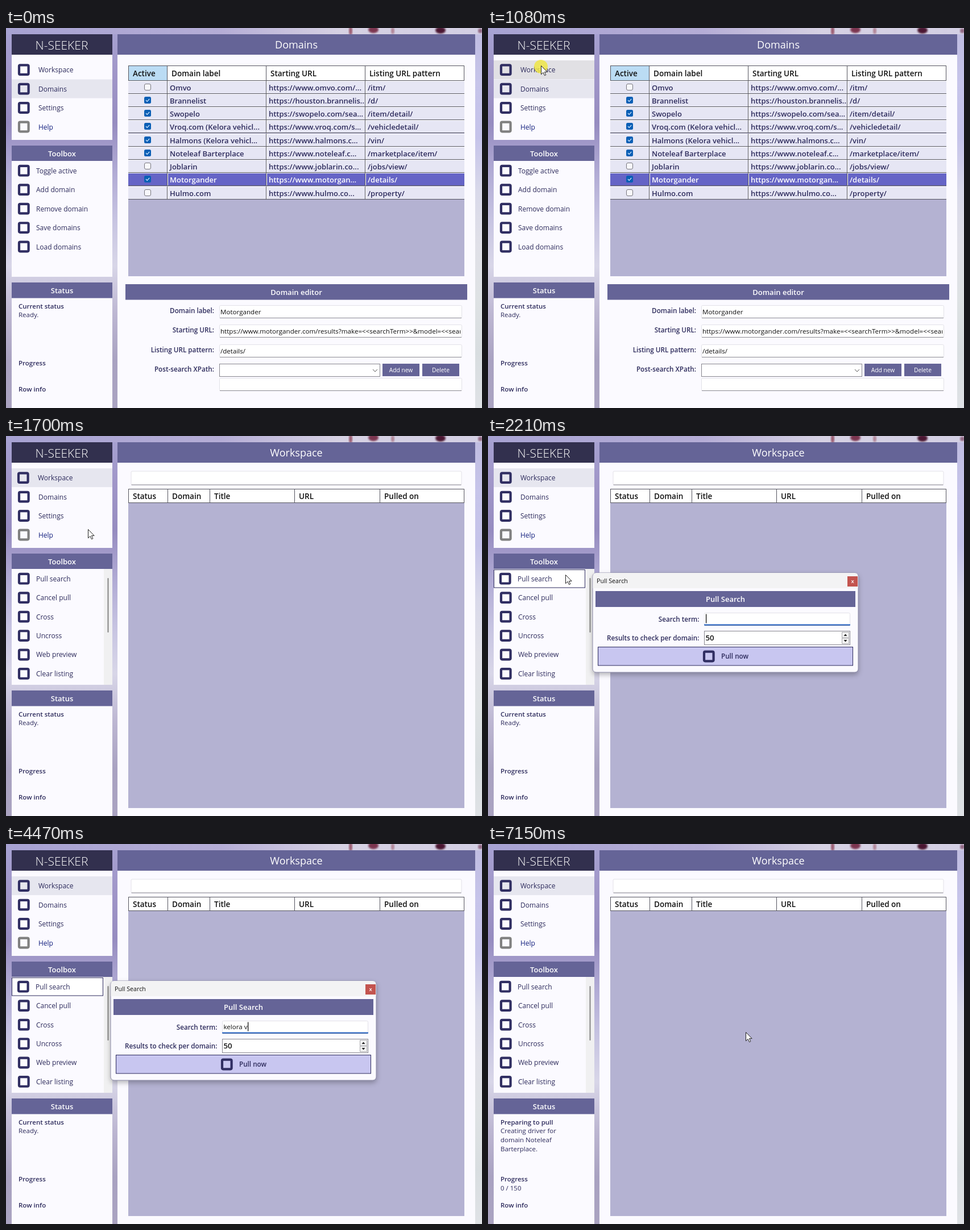
Animation of 837 by 669 pixels, one loop 8 s. Source, as an HTML page:

```html
<!DOCTYPE html>
<html lang="en">
<head>
<meta charset="utf-8">
<title>Search tool</title>
<style>
  html, body { margin: 0; width: 100%; height: 100%; overflow: hidden; }
  svg { display: block; width: 837px; height: 669px; font-family: "Open Sans", "Noto Sans", sans-serif; }
  text { white-space: pre; }
</style>
</head>
<body>
<svg id="stage" viewBox="0 0 837 669"></svg>
<script>
const NAVY = '#2d2b5c', BAR = '#656497', PANEL = '#fbfaff', BODY = '#b4b2d2', LINE = '#55555f';

const rect = (x, y, w, h, fill, more = '') =>
  `<rect x="${x}" y="${y}" width="${w}" height="${h}" fill="${fill}" ${more}/>`;
const frame = (x, y, w, h, fill, stroke, more = '') =>
  rect(x + .5, y + .5, w - 1, h - 1, fill, `stroke="${stroke}" ${more}`);
const escape = s => s.replace(/&/g, '&amp;').replace(/</g, '&lt;');
const text = (x, y, s, size, fill = NAVY, weight = 400, anchor = 'start', more = '') =>
  `<text x="${x}" y="${y}" font-size="${size}" fill="${fill}" font-weight="${weight}" text-anchor="${anchor}" ${more}>${escape(s)}</text>`;
const group = (id, body, more = '') => `<g id="${id}" ${more}>${body}</g>`;
const bar = (x, y, w, h, s, size = 13, weight = 600) =>
  rect(x, y, w, h, BAR) + text(x + w / 2, y + h / 2 + size * .39, s, size, '#fff', weight, 'middle');
const icon = (cx, cy, color = '#302e62') =>
  rect(cx - 8.3, cy - 8.3, 16.6, 16.6, 'none', `rx="2" stroke="${color}" stroke-width="4.2"`);
const item = (x, y, s, color, iconColor) => icon(31.3, y, iconColor) + text(x, y + 4.5, s, 12, color);
const field = (x, y, w, h) =>
  frame(x, y, w, h, '#fff', '#e2e1e8', 'rx="2"') + rect(x + 1, y + h - 1, w - 2, 1, '#8b8a92');
const tools = names => names.map((s, i) => item(53, 251.2 + i * 33.45, s)).join('');

function backdrop() {
  const grad = (id, ...colors) => `<linearGradient id="${id}" x2="0" y2="1">` + colors.map((c, i) =>
    `<stop offset="${i / (colors.length - 1)}" stop-color="${c}"/>`).join('') + '</linearGradient>';
  const spot = (x, y, rx, ry, c) => `<ellipse cx="${x}" cy="${y}" rx="${rx}" ry="${ry}" fill="${c}" filter="url(#soft)"/>`;
  return `<defs>
    ${grad('left', '#a7a2d2', '#a096c8', '#968cc0', '#b0aad4', '#c6c3e1', '#d8d6e8', '#bdb7d2', '#a9a2c1', '#aaa3c1')}
    ${grad('right', '#bfbce0', '#c6c4ea', '#c5c3ea', '#d9d9ea', '#e0e0e8', '#dee2e4', '#d8dde0', '#dfe2e6')}
    <linearGradient id="top"><stop stop-color="#a7a2d2"/><stop offset=".45" stop-color="#b5add6"/>
      <stop offset=".7" stop-color="#d6d1e3"/><stop offset="1" stop-color="#d3cfe4"/></linearGradient>
    <filter id="soft"><feGaussianBlur stdDeviation="1.6"/></filter>
  </defs>` + rect(0, 0, 500, 669, 'url(#left)') + rect(500, 0, 337, 669, 'url(#right)') + rect(0, 0, 837, 11, 'url(#top)') +
    spot(606, 5, 3, 8, '#9a5a70') + spot(646, 3, 9, 6, '#7c3550') + spot(680, 5, 3, 6, '#b08496') +
    spot(764, 4, 9, 6, '#4c1830') + spot(834, 5, 4, 4, '#8f6480');
}

function sidebar() {
  return rect(10, 11, 177, 186, PANEL) + rect(10, 11, 177, 36, '#32304e') +
    text(98, 38, 'N-SEEKER', 21, '#fff', 300, 'middle') +
    rect(10, 57, 177, 33, '#e6e6ef', 'id="navRow"') + rect(10, 57, 177, 33, '#e1e0e4', 'id="hover"') +
    group('navWork', item(57, 73.6, 'Workspace')) + item(57, 107.1, 'Domains') + item(57, 140.5, 'Settings') +
    item(57, 174, 'Help', '#14207f', '#808080') +
    rect(10, 207, 177, 231, PANEL) + bar(10, 207, 177, 27, 'Toolbox') +
    group('toolsDomains', tools(['Toggle active', 'Add domain', 'Remove domain', 'Save domains', 'Load domains'])) +
    group('toolsWork', rect(172, 234, 15, 204, '#f0f0f1') + rect(178.5, 250, 2, 96, '#858585', 'rx="1"') +
      frame(10, 235, 161, 32.5, '#fff', NAVY, 'id="focus"') +
      group('toolPull', tools(['Pull search'])) +
      group('toolRest', tools(['Cancel pull', 'Cross', 'Uncross', 'Web preview', 'Clear listing']), 'transform="translate(0 33.45)"')) +
    rect(10, 448, 177, 221, PANEL) + bar(10, 448, 177, 27.5, 'Status') +
    text(22, 493.5, 'Current status', 11.5, NAVY, 600, 'start', 'id="state"') +
    ['Ready.', '', ''].map((s, i) => text(22, 509.3 + i * 15.8, s, 11.5, NAVY, 400, 'start', 'class="detail"')).join('') +
    text(22, 594, 'Progress', 11.5, NAVY, 600) + text(22, 609.7, '0 / 150', 11.5, NAVY, 400, 'start', 'id="count"') +
    text(22, 640, 'Row info', 11.5, NAVY, 600);
}

function checkbox(cx, cy, on) {
  return on
    ? rect(cx - 6, cy - 6, 12, 12, '#0a5fb5', 'rx="2.5"') +
      `<path d="M${cx - 3} ${cy}l2.2 2.3 4-4.3" fill="none" stroke="#cfe6ff" stroke-width="1.2"/>`
    : frame(cx - 6, cy - 6, 12, 12, '#f7f7fb', '#77767e', 'rx="2.5"');
}

const sites = [
  [0, 'Omvo', 'https://www.omvo.com/...', '/itm/'],
  [1, 'Brannelist', 'https://houston.brannelis...', '/d/'],
  [1, 'Swopelo', 'https://swopelo.com/sea...', '/item/detail/'],
  [1, 'Vroq.com (Kelora vehicl...', 'https://www.vroq.com/s...', '/vehicledetail/'],
  [1, 'Halmons (Kelora vehicl...', 'https://www.halmons.c...', '/vin/'],
  [1, 'Noteleaf Barterplace', 'https://www.noteleaf.c...', '/marketplace/item/'],
  [0, 'Joblarin', 'https://www.joblarin.co...', '/jobs/view/'],
  [1, 'Motorgander', 'https://www.motorgan...', '/details/'],
  [0, 'Hulmo.com', 'https://www.hulmo.co...', '/property/']
];

function header(y, h, starts, names) {
  return frame(215, y, 591, h, '#fff', LINE) + names.map((s, i) =>
    (i ? rect(starts[i], y, 1, h, LINE) : '') + text(starts[i] + 8, y + h / 2 + 5, s, 13.5, '#111', 600)).join('');
}

function domains() {
  const cols = [215, 283, 457, 631];
  const rows = sites.map(([on, ...cells], i) => {
    const y = Math.round(92.6 + i * 23.25), hot = i === 7;
    return rect(215, y, 591, 23, hot ? '#6564c6' : '#e6e6f4') +
      rect(215, y, 591, 1, '#fff') + rect(215, y + 22, 591, 1, LINE) +
      checkbox(249, y + 11, on) + cells.map((s, j) =>
        rect(cols[j + 1], y, 1, 23, LINE) + rect(cols[j + 1] + 1, y, 1, 22, '#fff') +
        text(cols[j + 1] + 5, y + 16.6, s, 13, hot ? '#fff' : NAVY, 600)).join('');
  }).join('');
  const label = (y, s) => text(366, y, s, 11.7, NAVY, 600, 'end');
  const value = (y, s) => text(377, y, s, 11.6, '#111', 400, 'start', 'clip-path="url(#inputs)"');
  const button = (x, s) => rect(x, 591, 65, 22, BAR) + text(x + 32.5, 606, s, 10.3, '#fff', 400, 'middle');
  return '<clipPath id="inputs"><path d="M376 480h423v170h-423z"/></clipPath>' +
    bar(196, 11, 629, 36, 'Domains', 18, 400) + rect(215, 66, 591, 371, BODY) + rows +
    header(66, 27, cols, ['', 'Domain label', 'Starting URL', 'Listing URL pattern']) +
    frame(215, 66, 69, 27, '#bbdcf4', LINE) + text(223, 84.5, 'Active', 13.5, '#111', 600) +
    bar(210, 451, 601, 27.5, 'Domain editor') +
    label(501.5, 'Domain label:') + label(536, 'Starting URL:') + label(570.5, 'Listing URL pattern:') + label(605, 'Post-search XPath:') +
    [488, 522, 557, 616].map(y => field(375, y, 427, 23)).join('') +
    value(503.5, 'Motorgander') + value(538, 'https://www.motorgander.com/results?make=<<searchTerm>>&model=<<searchModel>>') +
    value(572.5, '/details/') + frame(375, 591, 283, 23, '#fff', '#87868e') +
    '<path d="M645 601l4 4 4-4" fill="none" stroke="#555"/>' + button(662, 'Add new') + button(732, 'Delete');
}

function workspace() {
  return bar(196, 11, 629, 36, 'Workspace', 18, 400) + field(219.5, 61.5, 582, 25) + rect(215, 93, 591, 562, BODY) +
    header(93, 25, [215, 284, 358, 507, 657], ['Status', 'Domain', 'Title', 'URL', 'Pulled on']);
}

function dialog() {
  const label = (y, s) => text(371.5, y, s, 11.7, NAVY, 600, 'end');
  return rect(184, 241, 467, 175, PANEL, 'rx="6" stroke="#8d8ba8" style="filter:drop-shadow(0 4px 4px #0004)"') +
    '<path d="M184.5 268v-21q0-6 6-6h454q6 0 6 6v21z" fill="#f3f3f4"/>' + text(191, 258.5, 'Pull Search', 10.7, '#111') +
    rect(632, 247, 18, 18, '#c3544f') + text(641, 259, 'x', 9.5, '#fff', 600, 'middle') +
    bar(189, 273, 457, 28, 'Pull Search') + label(327, 'Search term:') + label(359.5, 'Results to check per domain:') +
    field(380, 311, 257, 23) + rect(380, 331.5, 257, 2, '#2563c4', 'id="underline"') +
    text(382.5, 326, '', 11.6, '#111', 400, 'start', 'id="term"') +
    frame(380, 343, 257, 25, '#fff', '#87868e') + rect(382, 346, 16, 17, '#0a64c8', 'id="selection"') +
    text(382.5, 360, '', 13.3, '#111', 600, 'start', 'id="limit"') +
    frame(622, 345, 13, 10.5, '#f4f4f4', '#a9a9ad') + frame(622, 355.5, 13, 10.5, '#f4f4f4', '#a9a9ad') +
    '<path d="M625.5 352h6l-3-3.5zM625.5 359h6l-3 3.5z" fill="#222"/>' +
    frame(193, 371, 449, 33.5, '#c8c6f0', NAVY) + icon(388.3, 388) + text(410, 392, 'Pull now', 11.7, NAVY, 600) +
    rect(0, 0, 1.2, 16, '#000', 'id="caret"');
}

document.getElementById('stage').innerHTML = backdrop() + sidebar() + rect(196, 11, 629, 658, PANEL) +
  group('domains', domains()) + group('workspace', workspace()) + group('dialog', dialog()) +
  group('cursor', '<circle id="click" cx="0" cy="2" r="12" fill="#f0e63c" fill-opacity=".8"/>' +
    '<path id="arrow" d="M.5 .5v15.2l3.6-3.4 2.4 5.3 2.3-1-2.3-5.2h4.6z" fill="#fff" stroke="#222"/>' +
    '<path id="beam" d="M-3.5-8h2.5l1 1 1-1h2.5M-3.5 8h2.5l1-1 1 1h2.5M0-7v14" fill="none" stroke="#222"/>');

const $ = id => document.getElementById(id);
const show = (id, on) => $(id).style.display = on ? '' : 'none';
const move = (id, x, y) => $(id).setAttribute('transform', `translate(${x} ${y})`);
const clamp = v => Math.max(0, Math.min(1, v));
const ease = v => v * v * (3 - 2 * v);

// time, x, y; eased between neighbours
const path = [[400, 221, 655], [920, 93, 66], [1220, 93, 66], [1700, 144, 164], [1850, 136, 244], [2370, 136, 244],
  [3060, 474, 348], [3260, 473, 349], [3360, 473, 349], [3550, 453, 331]];
function pointer(t) {
  const i = path.findIndex(p => p[0] > t);
  if (i < 0) return path.at(-1).slice(1);
  if (!i) return path[0].slice(1);
  const [a, b] = [path[i - 1], path[i]], k = ease((t - a[0]) / (b[0] - a[0]));
  return [a[1] + (b[1] - a[1]) * k, a[2] + (b[2] - a[2]) * k];
}

const phrase = 'kelora venty';
function typed(t) {
  if (t < 3710) return 0;
  if (t < 3910) return 1;
  if (t < 4470) return 2 + Math.floor((t - 3910) / 93.4);
  return t < 4870 ? Math.min(11, 8 + Math.floor((t - 4470) / 80)) : 12;
}

function draw(t) {
  const work = t >= 1200, done = t >= 7150, tabbed = t >= 5070;
  const open = t >= 2010 && t < 6590;
  const [x, y] = pointer(t);

  show('domains', !work); show('toolsDomains', !work);
  show('workspace', work); show('toolsWork', work);
  $('navRow').setAttribute('y', work ? 57 : 90.5);
  show('hover', !work && t > 400 && y < 90);
  move('navWork', work && t < 1930 ? -1 : 0, 0);
  move('toolPull', t >= 1930 ? -1 : 0, 0);
  show('focus', t >= 1930 && !done);

  $('state').textContent = done ? 'Preparing to pull' : 'Current status';
  const lines = done ? ['Creating driver for', 'domain Noteleaf', 'Barterplace.'] : ['Ready.', '', ''];
  document.querySelectorAll('.detail').forEach((el, i) => el.textContent = lines[i]);
  show('count', done);

  show('dialog', open);
  if (open) {
    const k = ease(clamp((t - 2010) / 190)), s = .94 + .06 * k;
    $('dialog').style.opacity = k;
    $('dialog').setAttribute('transform', `translate(${417.5 * (1 - s)} ${328 * (1 - s)}) scale(${s})`);
    const selected = t >= 5670 && t < 5950;
    $('term').textContent = phrase.slice(0, typed(t));
    $('limit').textContent = t < 5950 ? '50' : t < 6110 ? '2' : '25';
    $('limit').setAttribute('fill', selected ? '#fff' : '#111');
    show('selection', selected);
    show('underline', !tabbed);
    const width = id => $(id).textContent ? $(id).getComputedTextLength() : 0;
    if (tabbed) move('caret', 382.5 + (t < 5950 ? 0 : width('limit')), 346);
    else move('caret', 383 + width('term'), 313.5);
    const blinkOff = (t >= 2480 && t < 3010) || (t >= 3540 && t < 3710) || (t >= 5630 && t < 5950);
    show('caret', !blinkOff);
  }

  const inField = open && x > 380 && x < 622 && ((y > 311 && y < 333) || (y > 343 && y < 367));
  show('cursor', (t >= 400 && t < 3710) || done);
  show('beam', inField); show('arrow', !inField);
  show('click', (t >= 1080 && t < 1220) || (t >= 1890 && t < 2030));
  move('cursor', x, y);
}

function tick() {
  draw(performance.now() % 8000);
  requestAnimationFrame(tick);
}
tick();
</script>
</body>
</html>
```
